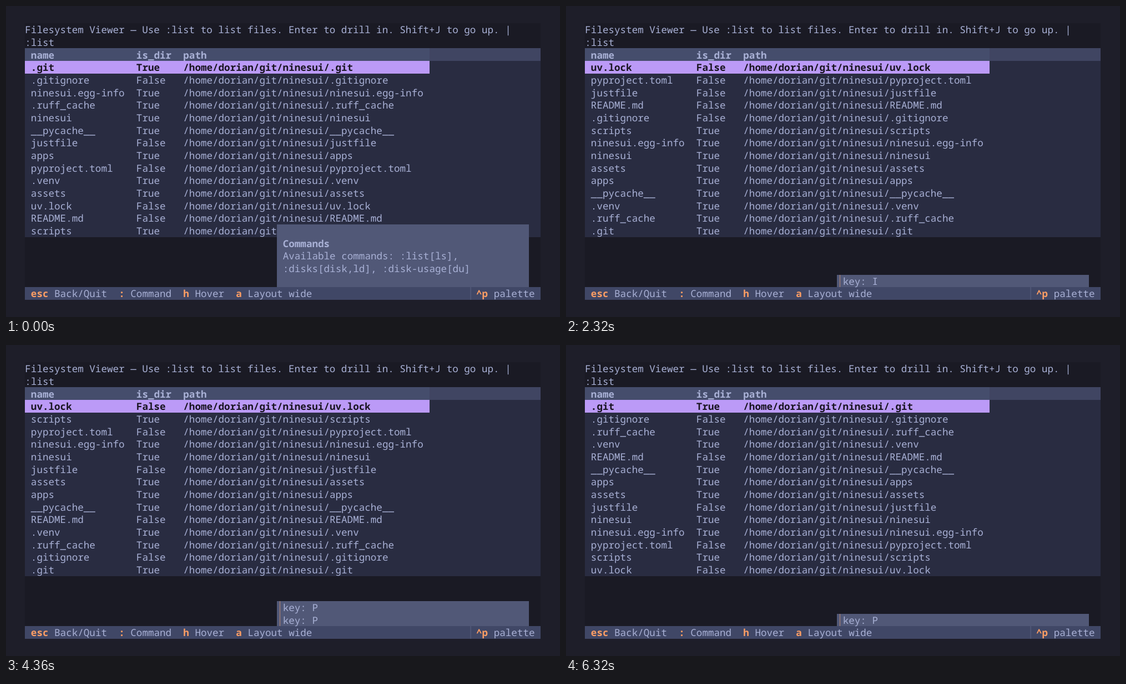
Recreate the animation shown at these times as an HTML page. Size 998 px wide and 561 px high, loop 6360 ms.

```html
<!DOCTYPE html>
<html lang="en">
<head>
<meta charset="utf-8">
<title>Filesystem Viewer</title>
<style>
  html, body { margin: 0; width: 100%; height: 100%; overflow: hidden; background: #1e1e29; }
  svg { display: block; width: 998px; height: 561px; }
  text {
    font: 17.59px "Noto Sans Mono", "DejaVu Sans Mono", monospace;
    fill: #a9b1d6;
    white-space: pre;
    text-rendering: geometricPrecision;
  }
  .bold { font-weight: 700; }
  .key { font-weight: 700; fill: #ff9e64; }
  .cursor { font-weight: 700; fill: #181420; }
</style>
</head>
<body>
<svg id="stage" viewBox="0 0 998 561"></svg>
<script>
const LOOP = 6360;
const LEFT = 34.3, TOP = 31, CELL_W = 10.555, CELL_H = 22.68, BASELINE = 18.2;
const NAME_COL = 1, DIR_COL = 19, PATH_COL = 27, TOAST_COL = 43;
const TOAST_BG = "#515877";
const HOME = "/home/dorian/git/ninesui/";

// Key presses, and the moments when the oldest toast expires.
const PRESSES = [40, 360, 680, 1040, 1360, 1680, 2040, 2360, 2720, 3040,
                 3360, 3720, 4040, 4360, 4720, 5040, 5360, 5720, 6040];
const EXPIRIES = [640, 1000, 1320, 1680, 2000, 2320, 2640, 3000, 3320,
                  3680, 4000, 4320, 4680, 5000, 5360, 5680, 6000, 6320];

// A trailing slash marks a directory.
const FILES = (".git/ .gitignore ninesui.egg-info/ .ruff_cache/ ninesui/ __pycache__/ justfile " +
  "apps/ pyproject.toml .venv/ assets/ uv.lock README.md scripts/").split(" ")
  .map(entry => ({ name: entry.replace("/", ""), isDir: entry.endsWith("/") }));

const stage = document.getElementById("stage");

function add(parent, tag, attrs = {}) {
  const node = document.createElementNS("http://www.w3.org/2000/svg", tag);
  for (const name in attrs) node.setAttribute(name, attrs[name]);
  return parent.appendChild(node);
}

const px = col => LEFT + col * CELL_W;
const py = row => Math.round(TOP + row * CELL_H);

function box(parent, col, row, endCol, endRow, fill) {
  add(parent, "rect", {
    x: Math.round(px(col)), y: py(row), fill,
    width: Math.round(px(endCol)) - Math.round(px(col)),
    height: py(endRow) - py(row)
  });
}

function label(parent, col, row, content, style = "") {
  const node = add(parent, "text", { x: px(col), y: TOP + row * CELL_H + BASELINE, class: style });
  node.textContent = content;
  return node;
}

function keyOf(press) {
  return press < 6 ? "N" : press < 12 ? "I" : "P";
}

// Each sort is stable and starts from the order left by the previous one.
function buildOrders() {
  const orders = [FILES];
  PRESSES.forEach((_, i) => {
    const sign = i % 2 ? -1 : 1;
    const value = keyOf(i) === "I" ? file => file.isDir : file => file.name;
    orders.push([...orders[i]].sort((a, b) =>
      sign * ((value(a) > value(b)) - (value(a) < value(b)))));
  });
  return orders;
}

function drawFrame() {
  box(stage, 0, 0, 88, 22, "#1a1a24");
  label(stage, 0, 0, "Filesystem Viewer — Use :list to list files. Enter to drill in. Shift+J to go up. |");
  label(stage, 0, 1, ":list");

  box(stage, 0, 2, 88, 3, "#404562");
  box(stage, 0, 2, 69, 3, "#454d6c");
  box(stage, 0, 3, 88, 17, "#292c41");
  box(stage, 0, 3, 69, 4, "#bb9af7");
  label(stage, NAME_COL, 2, "name", "bold");
  label(stage, DIR_COL, 2, "is_dir", "bold");
  label(stage, PATH_COL, 2, "path", "bold");

  box(stage, 0, 21, 88, 22, "#404766");
  const hints = [[1, "esc", "Back/Quit"], [16, ":", "Command"], [27, "h", "Hover"],
                 [36, "a", "Layout wide"], [77, "^p", "palette"]];
  for (const [col, key, action] of hints) {
    label(stage, col, 21, key, "key");
    label(stage, col + key.length + 1, 21, action);
  }
  add(stage, "rect", { x: px(76), y: py(21), width: 1.3, height: py(22) - py(21), fill: "#565d7e" });
}

function drawHelp(parent) {
  box(parent, TOAST_COL, 16, 86, 21, TOAST_BG);
  label(parent, TOAST_COL + 1, 17, "Commands", "bold");
  label(parent, TOAST_COL + 1, 18, "Available commands: :list[ls],");
  label(parent, TOAST_COL + 1, 19, ":disks[disk,ld], :disk-usage[du]");
}

function drawToast(parent, row, key) {
  box(parent, TOAST_COL, row, 86, row + 1, TOAST_BG);
  add(parent, "rect", {
    x: 493, y: py(row), width: 1, height: py(row + 1) - py(row), fill: "#b9876f"
  });
  label(parent, TOAST_COL + 1, row, "key: " + key);
}

drawFrame();
const orders = buildOrders();
const rows = FILES.map((_, i) => [NAME_COL, DIR_COL, PATH_COL]
  .map(col => label(stage, col, i + 3, "", i ? "" : "cursor")));
const toasts = add(stage, "g");
let shown = "";

function render(time) {
  const pressed = PRESSES.filter(at => at <= time).length;
  const expired = EXPIRIES.filter(at => at <= time).length;
  const state = pressed + "/" + expired;
  if (state === shown) return;
  shown = state;

  orders[pressed].forEach((file, i) => {
    const [name, dir, path] = rows[i];
    name.textContent = file.name;
    dir.textContent = file.isDir ? "True" : "False";
    path.textContent = HOME + file.name;
  });

  toasts.replaceChildren();
  if (!pressed) drawHelp(toasts);
  for (let i = expired; i < pressed; i++) drawToast(toasts, 21 - pressed + i, keyOf(i));
}

function tick() {
  render(performance.now() % LOOP);
  requestAnimationFrame(tick);
}
tick();
</script>
</body>
</html>
```
